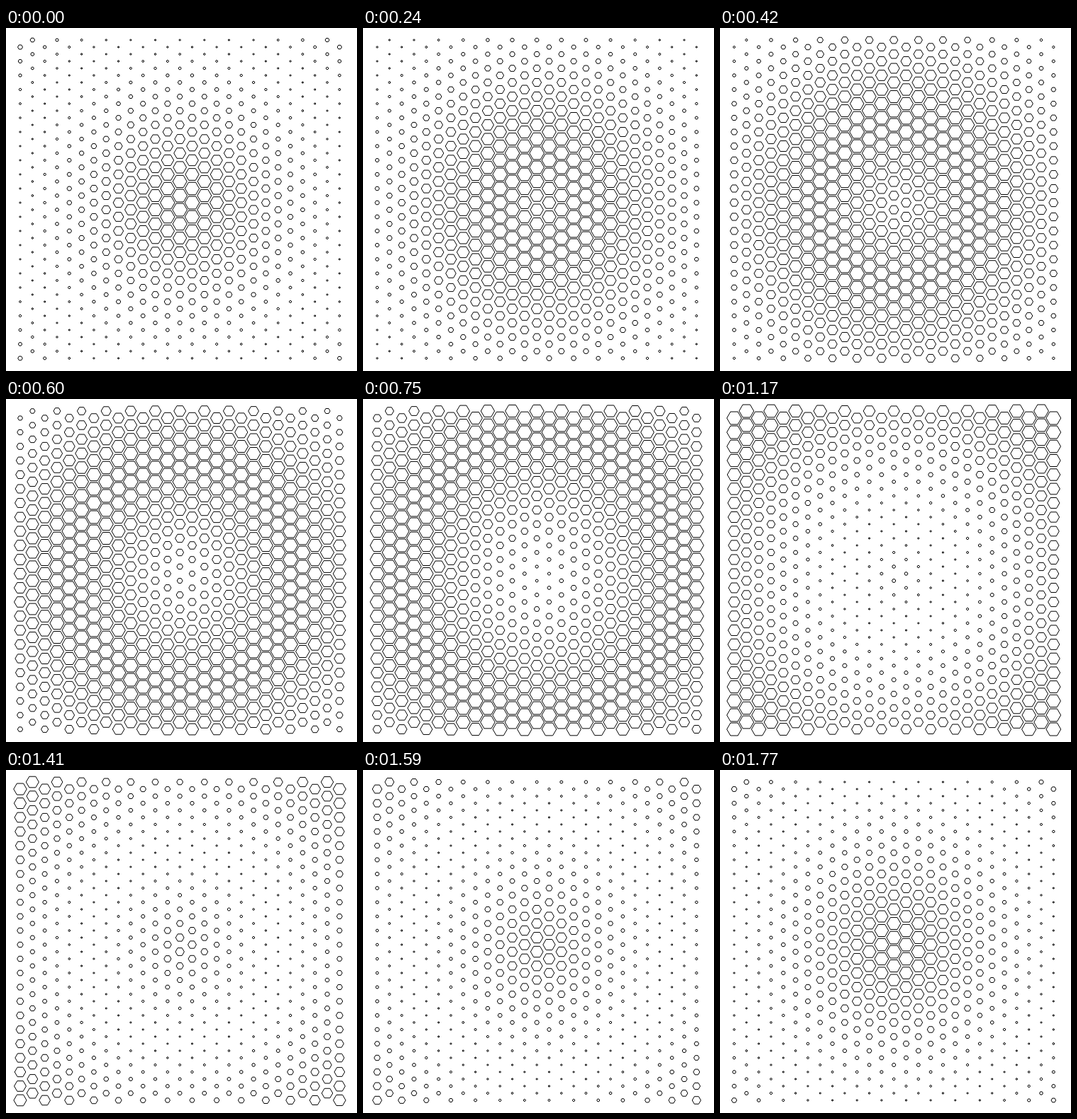
These frames come from a looping animation (495 px wide and 485 px high, 1.8 s). An HTML page:

```html
<!DOCTYPE html>
<html lang="en">
<head>
<meta charset="utf-8">
<title>Hexagon ripple</title>
<style>
  html, body { margin: 0; width: 100%; height: 100%; overflow: hidden; background: #fff; }
  svg { display: block; }
</style>
</head>
<body>
<svg width="495" height="485" viewBox="0 0 495 485">
  <path id="cells" fill="none" stroke="#000" stroke-width="1"/>
</svg>
<script>
const LOOP = 1800, STEP = 30;
const COLUMNS = 27, ROWS = 23, PITCH = 20;
const HALF = Math.sqrt(3) / 2;
const CELL = PITCH / (2 * HALF);
const CENTER = { x: 250, y: 250 };
const WAVELENGTH = 480;

const cells = [];
for (let col = 0; col < COLUMNS; col++) {
  for (let row = 0; row < ROWS; row++) {
    const x = 20 + col * PITCH * HALF;
    const y = (col % 2 ? 17 : 27) + row * PITCH;
    cells.push({ x, y, lag: Math.hypot(x - CENTER.x, y - CENTER.y) / WAVELENGTH });
  }
}

function hexagon(x, y, r) {
  const h = r * HALF, s = r / 2;
  const n = v => v.toFixed(2);
  return `M${n(x - r)} ${n(y)}l${n(s)} ${n(-h)}h${n(r)}l${n(s)} ${n(h)}l${n(-s)} ${n(h)}h${n(-r)}z`;
}

const path = document.getElementById('cells');

function draw(time) {
  const phase = Math.floor((time % LOOP) / STEP) * STEP / LOOP;
  path.setAttribute('d', cells.map(({ x, y, lag }) => {
    const wave = Math.cos(2 * Math.PI * (phase - lag));
    return hexagon(x, y, CELL * (0.5 + 0.4 * wave));
  }).join(''));
}

const start = performance.now();
function tick() {
  draw(performance.now() - start);
  requestAnimationFrame(tick);
}
draw(0);
requestAnimationFrame(tick);
</script>
</body>
</html>
```
